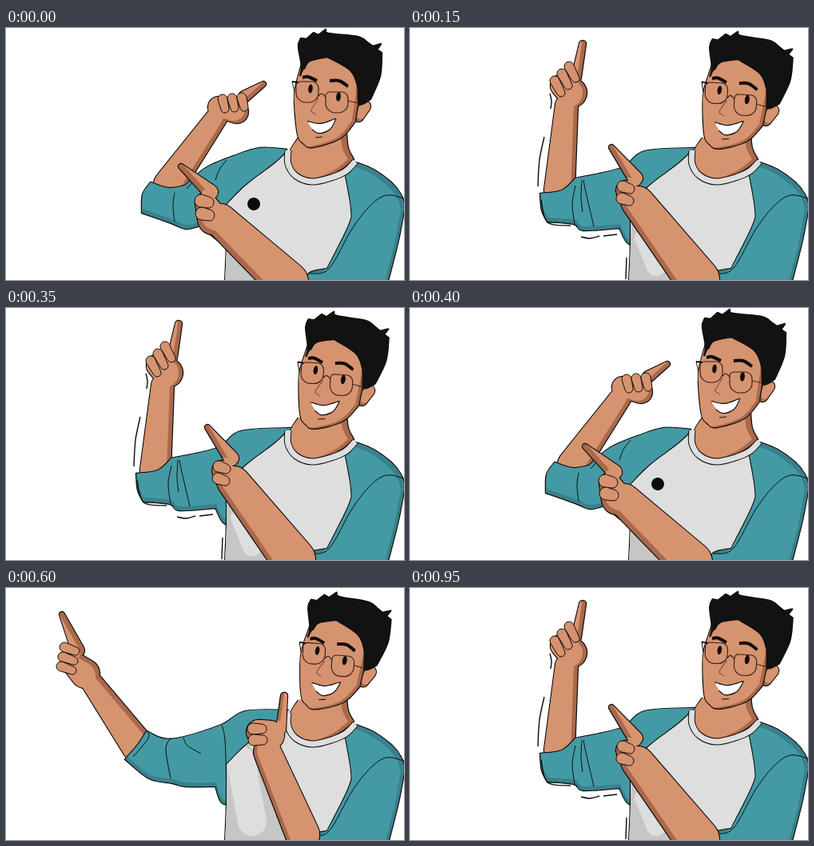
Animation of 498 by 315 pixels, one loop 1000 ms. Source, as an HTML page with a canvas:

```html
<!DOCTYPE html>
<html lang="en">
<head>
<meta charset="utf-8">
<title>Pointing man</title>
<style>
html, body { margin: 0; width: 100%; height: 100%; overflow: hidden; background: #fff; }
canvas { display: block; }
</style>
</head>
<body>
<canvas id="stage" width="498" height="315"></canvas>
<script>
const ctx = document.getElementById('stage').getContext('2d');
const INK = '#0c0c0c', HAIR = '#121212', FRAME = '#30201a';
const SKIN = ['#d6936f', '#a9694a'], TEAL = ['#449aa4', '#3a808c'], SHIRT = ['#dedede', '#c6c6c6'];

// Smooth curve through "x,y" points; "|" makes a sharp corner.
function curve(text) {
  const path = new Path2D();
  let last;
  for (const run of text.split('|')) {
    const pts = run.trim().split(/\s+/).map(s => s.split(',').map(Number));
    if (last) pts.unshift(last);
    else path.moveTo(...pts[0]);
    for (let i = 0; i < pts.length - 1; i++) {
      const b = pts[i], c = pts[i + 1], a = pts[i - 1] || b, d = pts[i + 2] || c;
      path.bezierCurveTo(b[0] + (c[0] - a[0]) / 6, b[1] + (c[1] - a[1]) / 6,
        c[0] - (d[0] - b[0]) / 6, c[1] - (d[1] - b[1]) / 6, ...c);
    }
    last = pts.at(-1);
  }
  return path;
}

// Outline around tapered limbs, each running from circle x,y,r to circle X,Y,R.
function limbs(...list) {
  const path = new Path2D();
  for (const [x, y, r, X, Y, R] of list) {
    const a = Math.atan2(Y - y, X - x), k = Math.acos((r - R) / Math.hypot(X - x, Y - y));
    path.moveTo(x + r * Math.cos(a + k), y + r * Math.sin(a + k));
    path.arc(x, y, r, a + k, a - k + 2 * Math.PI);
    path.arc(X, Y, R, a - k, a + k);
    path.closePath();
  }
  return path;
}

function line(text, width = 1, color = INK) {
  ctx.lineWidth = width;
  ctx.strokeStyle = color;
  ctx.stroke(curve(text));
}

// Outlined shape whose lit side is the same shape moved by dx, dy.
function part(path, [light, dark], dx = 0, dy = 0) {
  ctx.lineWidth = 2.4;
  ctx.strokeStyle = INK;
  ctx.stroke(path);
  ctx.fillStyle = dark;
  ctx.fill(path);
  ctx.save();
  ctx.clip(path);
  ctx.translate(dx, dy);
  ctx.fillStyle = light;
  ctx.fill(path);
  ctx.restore();
}

function oval(x, y, rx, ry) {
  ctx.fillStyle = INK;
  ctx.beginPath();
  ctx.ellipse(x, y, rx, ry, .1, 0, 7);
  ctx.fill();
}

// Each arm: index finger, fist and forearm, then a row of curled fingers.
const out = {
  turn: 0, drop: 0,
  far: {
    limbs: [[322, 70, 3, 298, 86, 7], [266, 99, 13, 289, 105, 14], [263, 113, 13, 204, 196, 19]],
    curl: { n: 3, at: [271, 89], step: [12, -1], along: [3, 12], r: 6 }, light: [-4, -3]
  },
  near: {
    limbs: [[219, 173, 3, 256, 205, 9], [250, 219, 13, 259, 239, 19], [268, 240, 20, 352, 318, 26]],
    curl: { n: 2, at: [244, 216], step: [1, 16], along: [9, 2], r: 8 }, light: [4, -5]
  },
  sleeve: '352,152 318,150 285,160 250,175 224,197 | 203,200 181,193 | 171,208 170,231 | 207,244 225,251 243,247 | 277,268 310,230',
  folds: ['211,206 209,222 211,242', '238,184 232,194 226,201', '276,165 267,177 262,190'],
  shade: [276, 262], badge: true
};

const middle = {
  turn: 3, drop: 0,
  far: {
    limbs: [[216, 20, 4, 208, 62, 6], [190, 72, 14, 203, 81, 18], [196, 97, 14, 187, 203, 19]],
    curl: { n: 3, at: [181, 66], step: [9, -9], along: [8, 15], r: 6 }, light: [-5, 0]
  },
  near: {
    limbs: [[252, 149, 3, 282, 188, 9], [270, 203, 12, 283, 219, 18], [285, 218, 20, 360, 315, 27]],
    curl: { n: 2, at: [266, 198], step: [-1, 15], along: [9, 3], r: 7 }, light: [4, -4]
  },
  sleeve: '357,150 294,154 264,175 207,188 | 190,203 163,207 | 165,228 172,242 | 205,245 217,253 262,250 | 279,270 320,230',
  folds: ['207,197 203,220 206,245', '217,190 220,205 230,248', '215,190 214,212 216,230'],
  shade: [279, 246], glow: [290, 262, 9, 308, 298, 12],
  swish: ['175,82 177,91 176,101', '168,136 162,165 160,198', '164,215 172,243 201,247', '214,261 225,263 237,260', '242,260 259,258', '271,287 270,314']
};

const up = {
  turn: 4, drop: 3,
  far: {
    limbs: [[70, 33, 3, 90, 78, 8], [83, 93, 14, 99, 107, 18], [108, 119, 13, 164, 196, 20]],
    curl: { n: 3, at: [73, 74], step: [-2, 12], along: [14, 5], r: 6 }, light: [-5, 3]
  },
  near: {
    limbs: [[348, 135, 4, 344, 177, 6], [316, 180, 15, 330, 184, 18], [327, 205, 17, 371, 308, 21]],
    curl: { n: 2, at: [309, 176], step: [1, 14], along: [11, 0], r: 7 }, light: [4, -2]
  },
  sleeve: '354,153 300,154 267,172 206,189 176,179 | 165,196 149,214 | 179,238 208,244 225,248 262,248 | 276,270 320,230',
  folds: ['176,178 178,188 159,211', '206,187 200,202 206,238', '222,187 227,197 244,207', '270,171 274,190 276,242'],
  shade: [304, 194], glow: [294, 216, 18, 308, 292, 18]
};

function drawArm({ limbs: list, curl, light }) {
  part(limbs(...list), SKIN, ...light);
  const { n, at: [x, y], step: [sx, sy], along: [ax, ay], r } = curl;
  for (let i = 0; i < n; i++) {
    const X = x + i * sx, Y = y + i * sy, finger = limbs([X, Y, r, X + ax, Y + ay, r - 1]);
    ctx.fillStyle = SKIN[0];
    ctx.fill(finger);
    ctx.lineWidth = 1;
    ctx.stroke(finger);
  }
}

function drawShirt({ shade: [x, y], glow, badge }) {
  const body = curve('353,153 338,168 300,197 276,221 | 276,270 274,320 | 400,320 | 429,247 432,225 425,178');
  part(body, SHIRT);
  ctx.save();
  ctx.clip(body);
  ctx.fillStyle = SHIRT[1];
  ctx.fill(curve(`${x},${y} | 360,330 | 270,330 | 270,${y}`));
  ctx.fillStyle = SHIRT[0];
  if (glow) ctx.fill(limbs(glow));
  ctx.restore();
  if (badge) oval(310, 220, 8, 8);
}

function drawShoulder() {
  part(curve('438,168 460,177 482,193 494,208 499,222 | 491,265 477,320 | 373,320 | 380,306 402,301 | 429,247 432,225 424,179'), TEAL, -5, 4);
  line('498,213 476,209 456,222 433,251 404,301 380,307');
}

function drawNeck() {
  part(curve('366,137 355,156 358,175 384,189 415,179 435,164 | 428,150 426,130'), SKIN, -7, 0);
  const collar = '353,153 353,170 363,185 383,192 407,187 425,179 437,167';
  line(collar, 9);
  line(collar, 7, SHIRT[0]);
}

function lens(x, y) {
  ctx.beginPath();
  ctx.roundRect(x, y, 28, 26, [5, 8, 12, 12]);
  ctx.lineWidth = 1.1;
  ctx.strokeStyle = FRAME;
  ctx.stroke();
}

function drawHead(turn) {
  ctx.save();
  ctx.translate(380 + turn / 2, 170 + turn / 2);
  ctx.rotate(turn * Math.PI / 180);
  ctx.translate(-380, -170);

  part(limbs([449, 98, 7, 441, 111, 6]), SKIN, 3, -3);
  part(curve('370,45 362,75 361,94 365,133 372,144 384,149 418,138 437,117 | 442,65 425,38 390,34'), SKIN, -4, -1);
  part(curve('368,60 370,48 366,23 369,13 | 376,14 | 385,6 | 391,9 | 400,2 | 404,7 440,11 452,18 | 459,23 | 469,20 | 464,27 | 470,31 | 468,60 456,89 | 442,95 440,72 430,52 402,36 | 380,41 373,51'), [HAIR, HAIR]);

  line('371,62 378,61 389,66', 4);
  line('405,66 417,66 428,73', 4);
  oval(381, 76, 2.7, 5.5);
  oval(416, 86, 2.9, 5.7);
  lens(363, 67);
  lens(400, 80);
  line('391,85 395,82 400,86', 1.2, FRAME);
  line('428,91 441,94', 1, FRAME);
  line('358,67 | 366,68', 1.8);
  line('358,67 361,80');
  line('391,88 384,99 382,104 388,108', 1, '#774630');

  part(curve('377,117 394,120 412,114 | 405,126 392,131 383,126'), ['#fff', '#fff']);
  line('387,137 396,136');
  ctx.restore();
}

function draw(pose) {
  ctx.fillStyle = '#fff';
  ctx.fillRect(0, 0, 498, 315);
  ctx.lineJoin = 'round';
  drawArm(pose.far);
  part(curve(pose.sleeve), TEAL, 1, -5);
  pose.folds.forEach(f => line(f));
  drawShirt(pose);
  ctx.save();
  ctx.translate(0, pose.drop);
  drawShoulder();
  drawNeck();
  ctx.restore();
  drawHead(pose.turn);
  drawArm(pose.near);
  (pose.swish || []).forEach(s => line(s, 1.4));
}

// Poses held until the given time in ms.
const LOOP = 1000;
const holds = [[150, out], [200, middle], [350, up], [400, middle], [550, out], [600, middle], [950, up], [LOOP, middle]];

function tick() {
  const t = performance.now() % LOOP;
  draw(holds.find(([end]) => t < end)[1]);
  requestAnimationFrame(tick);
}
tick();
</script>
</body>
</html>
```
